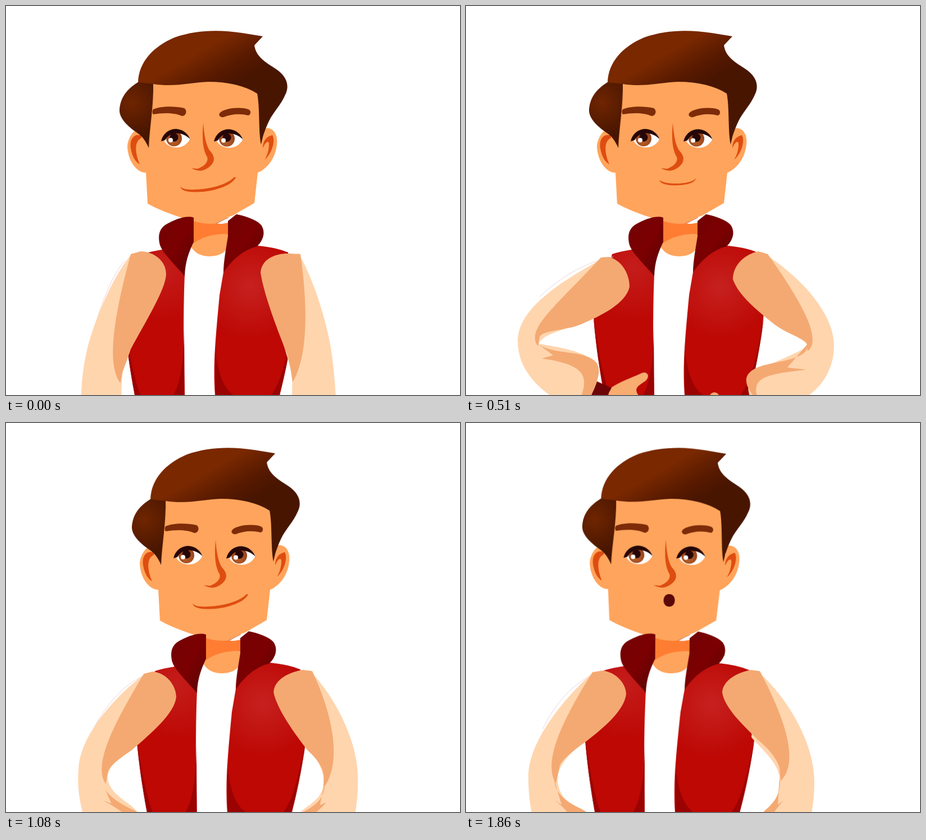
Animation, 808 px wide and 693 px high, one loop 1890 ms. Source, as an HTML page:

```html
<!DOCTYPE html>
<html lang="en">
<head>
<meta charset="utf-8">
<title>Standing man</title>
<style>
  html, body { margin: 0; width: 100%; height: 100%; overflow: hidden; background: #fff; }
  svg { display: block; width: 808px; height: 693px; }
  #body { transform-origin: 360px 693px; }
  .skin { fill: #ffa45c; }
  .hand { fill: #f8ac70; }
  .line { fill: #de4d10; }
  .brow { fill: #7d2b08; }
  .lash { fill: #260607; }
  .white { fill: #fff; }
  .shade { fill: #9a0302; }
  .light { fill: #ffd5ae; }
  .tan { fill: #f4a972; }
  #seam { fill: none; stroke: #ecd3d8; stroke-width: 1; }
</style>
</head>
<body>
<svg viewBox="0 0 808 693">
  <defs>
    <linearGradient id="hair" gradientUnits="userSpaceOnUse" x1="350" y1="80" x2="390" y2="150">
      <stop offset="0" stop-color="#792800"/><stop offset=".25" stop-color="#6a2200"/>
      <stop offset=".6" stop-color="#571900"/><stop offset="1.0" stop-color="#481500"/>
    </linearGradient>
    <radialGradient id="tuft" gradientUnits="userSpaceOnUse" cx="224" cy="172" r="62">
      <stop offset="0" stop-color="#6f2501"/><stop offset="1" stop-color="#471500"/>
    </radialGradient>
    <radialGradient id="iris" cx=".45" cy=".65" r=".6">
      <stop offset="0" stop-color="#b9612b"/><stop offset="1" stop-color="#98431a"/>
    </radialGradient>
    <radialGradient id="vest" gradientUnits="userSpaceOnUse" cx="435" cy="500" r="95">
      <stop offset="0" stop-color="#c6211f"/><stop offset="1" stop-color="#bd0804"/>
    </radialGradient>
    <radialGradient id="vestLeft" gradientUnits="userSpaceOnUse" cx="280" cy="465" r="100">
      <stop offset="0" stop-color="#c41d1b"/><stop offset="1" stop-color="#bd0804"/>
    </radialGradient>
    <linearGradient id="collar" x1="0" y1="0" x2="1" y2="1">
      <stop offset="0" stop-color="#720304"/><stop offset=".5" stop-color="#7c0001"/><stop offset="1" stop-color="#570507"/>
    </linearGradient>
  </defs>

  <g id="body">
    <path fill="url(#vestLeft)" d="M243 442Q258 437 278 434L305 440L318 478C315 550 316 620 318 693V720H233L229 693C221 650 214 605 210 555C222 525 232 480 243 442Z"/>
    <path fill="url(#vest)" d="M387 474L405 430L447 427C468 429 485 432 502 439L513 548C508 600 497 655 487 693L482 720H372V693C368 640 373 590 380 515Z"/>
    <path class="shade" d="M317 570C317 620 313 668 298 693L285 720H318ZM210 555C217 605 226 660 239 693L245 720H233L229 693C221 650 214 605 210 555ZM372 606C375 650 387 682 405 693L420 720H372ZM513 555C502 620 490 670 472 693L460 720H482L487 693C497 655 508 600 513 555Z"/>
    <path class="skin" d="M330 376V430Q340 446 363 446Q383 445 391 435L402 384Z"/>
    <path fill="#ff7d33" d="M330 376V425C348 411 370 406 392 406L402 412V380Z"/>
    <path class="skin" d="M250 218C232 212 216 232 216 252C218 278 233 297 249 297L252 352C280 368 325 382 350 387Q372 390 385 384L442 351L448 297C468 288 480 268 482 247C485 224 470 212 456 220L458 130H255Z"/>
    <path class="line" d="M241 231C228 226 219 238 222 254C225 270 231 278 238 282C231 266 226 242 241 235ZM474 230C461 233 457 243 457 253C462 242 467 239 468 245C468 257 465 266 460 274C473 263 480 240 474 230Z"/>
    <path class="white" d="M376 388L398 375L410 371L396 386L384 388Z"/>
    <path d="M374 387L396 377" fill="none" stroke="#c98a80" stroke-width="1"/>
    <path fill="url(#collar)" d="M334 377C322 372 300 380 285 389C272 397 270 410 274 426C279 440 297 457 318 481C319 455 325 440 334 420Z"/>
    <path fill="url(#collar)" d="M395 383L410 371C425 374 445 380 454 390C462 402 459 416 447 428C420 435 400 455 387 475C387 455 392 430 395 410Z"/>
    <path fill="url(#tuft)" d="M236 135C215 148 203 163 202 186C202 200 215 213 232 225C242 231 249 241 254 253C255 218 263 180 262 135Z"/>
    <path fill="url(#hair)" d="M235 136C236 100 262 72 300 56C340 42 380 42 420 48L457 54L442 70C445 91 462 100 480 112C500 125 505 142 497 158C490 175 475 190 468 205C460 222 456 235 454 247C449 225 452 180 447 156C425 142 395 135 360 135C330 136 300 145 262 139Z"/>
    <path class="brow" d="M262 184C275 178 300 178 317 182C323 186 321 196 313 196C300 190 280 190 262 193C260 191 260 186 262 184ZM381 190C390 182 415 179 431 184C437 186 436 194 431 195C415 191 400 193 387 198C381 199 377 194 381 190Z"/>
    <g id="eye">
      <path class="white" d="M280 238C288 222 318 222 328 236C322 248 313 252 303 252C293 252 284 247 280 238Z"/>
      <circle fill="url(#iris)" cx="299" cy="236" r="14"/>
      <circle class="lash" cx="299" cy="234" r="7.5"/>
      <circle class="white" cx="293" cy="239" r="4"/>
      <path class="lash" d="M276 241C279 227 290 219 303 219C316 220 324 228 328 238C316 224 292 222 283 239Z"/>
    </g>
    <use href="#eye" x="94" y="0.5"/>
    <path class="line" d="M351 208C353 235 357 250 363 258C374 270 371 280 360 288C350 295 342 295 330 289L341 290C352 286 361 278 358 269C349 254 349 230 351 208Z"/>
    <path id="mouth"/>
  </g>

  <g id="hands">
    <path class="hand" d="M255 682C275 668 295 662 312 654C324 650 328 660 319 668C305 677 299 681 306 692L325 780H240ZM433 694C438 686 446 686 451 694L460 780H430Z"/>
    <path fill="#6d0508" d="M232 668L259 680L248 700L215 700Z"/>
  </g>
  <path id="seam"/>
  <path id="outerL" class="light"/><path id="foreL" class="tan"/><path id="upperL" class="tan"/>
  <path id="outerR" class="light"/><path id="foreR" class="tan"/><path id="upperR" class="tan"/>
</svg>
<script>
const LOOP = 1890;
const TIMES = [0, 180, 510, 840, 960, 1320, 1620, 1860];

// Runs [time, style] keys in an endless loop; the last key is held to the end.
function loop(id, keys, easing = "linear") {
  const frames = keys.map(([t, style]) => ({ ...style, easing, offset: t / LOOP }));
  frames.push({ ...frames[frames.length - 1], offset: 1 });
  document.getElementById(id).animate(frames, { duration: LOOP, iterations: Infinity });
}
const shape = d => ({ d: `path("${d}")` });
const morph = (id, poses) => loop(id, poses.map((d, i) => [TIMES[i], shape(d)]));

const sway = [[0, 0], [6, 0], [17, 0], [24, 0], [25, 0], [15.5, .1], [5, .6], [0, .55]];
loop("body", sway.map(([x, a], i) => [TIMES[i], { transform: `translateX(${x}px) rotate(${a}deg)` }]));

const drop = [110, 55, 0, 65, 90, 38, 55, 70];
loop("hands", drop.map((y, i) => [TIMES[i], { transform: `translate(${sway[i][0] - 17}px, ${y}px)` }]));

morph("seam", [
  "M161 562C175 515 195 470 212 453",
  "M127 528C150 495 205 455 250 446",
  "M131 518C160 490 210 455 262 447",
  "M149 533C170 500 215 455 262 445",
  "M168 548C185 508 218 463 250 449",
  "M136 529C165 490 205 455 255 446",
  "M135 538C150 505 195 455 245 444",
  "M137 545C155 505 190 460 240 442"
]);
morph("outerL", [
  "M225 440C190 480 158 560 145 610C136 650 134 675 133 720L205 720C206 690 205 680 208 655C212 630 240 560 250 500Z",
  "M240 448C190 475 90 540 90 618C90 655 105 680 118 700L232 700C228 662 135 645 133 608C145 580 190 568 230 545Z",
  "M248 447C180 485 92 535 92 597C92 640 120 675 155 697L222 695C250 640 240 618 130 602C135 580 200 575 240 545Z",
  "M255 447C205 475 115 550 115 622C115 660 122 680 130 700L245 700C235 675 165 675 163 625C165 590 200 575 240 550Z",
  "M253 444C210 478 149 555 143 616C138 655 141 678 144 710L238 710C233 683 198 678 198 640C201 610 233 568 258 525Z",
  "M245 447C195 475 102 540 102 612C102 650 115 675 130 700L243 700C243 665 155 655 146 610C155 590 200 570 230 553Z",
  "M235 446C190 475 106 555 106 625C106 660 115 680 122 700L235 700C228 680 160 670 155 622C160 595 195 572 222 555Z",
  "M228 443C190 475 111 560 111 630C111 660 114 680 118 700L210 700C200 685 163 675 163 632C165 605 195 580 215 562Z"
]);
morph("upperL", [
  "M240 437C265 438 285 455 285 478C284 505 250 560 222 612C215 635 210 645 207 655L204 672C180 640 190 560 222 442Z",
  "M248 446C275 455 285 478 284 497C280 525 230 548 185 568C160 578 140 588 137 602L134 625C112 590 150 540 235 448Z",
  "M255 447C280 455 291 480 291 500C285 530 240 552 205 567C175 579 138 577 131 589L128 606C105 575 160 535 240 448Z",
  "M262 445C288 447 304 475 304 492C300 520 260 545 220 565C190 580 170 595 165 605L160 632C138 600 180 540 248 450Z",
  "M264 441C289 443 307 465 307 485C305 513 268 553 234 589C215 608 203 620 199 630L195 652C172 620 198 550 248 446Z",
  "M255 446C282 450 295 475 295 495C290 525 245 548 205 570C170 582 150 592 147 605L143 625C125 590 160 540 240 448Z",
  "M248 443C275 448 289 470 289 490C285 520 245 545 205 570C175 587 160 597 157 605L150 632C130 600 155 540 232 446Z",
  "M243 441C268 444 285 465 285 483C282 510 250 540 210 570C185 588 170 602 167 610L160 642C138 605 165 540 225 444Z"
]);
morph("foreL", [
  "M200 700C205 705 210 710 215 720C220 725 225 730 230 740L215 740C210 735 200 725 195 715L198 710Z",
  "M130 605C135 632 160 648 190 658C225 668 232 680 230 695L205 695C207 682 180 672 130 648L152 653Z",
  "M128 602C150 618 190 615 215 624C245 635 240 655 222 695L205 695C220 655 205 638 135 628L155 622Z",
  "M157 622C165 650 190 668 215 680C235 688 240 695 243 705L200 705C205 690 185 675 155 655L175 667Z",
  "M190 663C198 678 213 689 228 700C240 707 248 713 249 723L220 723C220 713 205 700 188 685L199 689Z",
  "M140 610C142 635 175 650 205 660C235 668 245 680 243 695L213 695C220 675 200 668 143 648L165 656Z",
  "M145 615C148 645 175 665 200 675C222 682 232 690 235 700L190 700C195 688 180 675 147 660L165 670Z",
  "M157 635C158 660 180 675 200 685C215 692 225 700 230 712L185 712C190 700 175 685 155 670L170 680Z"
]);
morph("outerR", [
  "M520 440C545 480 570 560 578 610C584 650 586 680 588 720L510 720C508 690 510 680 508 655C503 630 490 600 480 540Z",
  "M520 438C570 470 638 550 638 620C638 655 632 675 622 700L500 700C520 665 585 665 584 610C575 585 545 572 515 545Z",
  "M525 438C580 470 655 540 655 605C655 645 635 680 600 700L507 700C485 645 540 645 608 607C606 592 565 583 525 545Z",
  "M540 440C590 480 641 560 641 630C641 660 636 680 630 700L500 700C525 680 590 680 585 630C588 600 560 580 530 550Z",
  "M543 440C580 480 618 560 622 620C625 655 624 680 622 710L518 710C529 685 563 680 559 643C558 615 538 590 518 545Z",
  "M530 440C580 475 633 560 633 620C633 655 625 680 615 700L505 700C525 670 575 670 577 620C575 595 550 575 525 552Z",
  "M522 440C575 480 626 560 626 630C626 660 622 680 615 700L505 700C520 680 570 680 567 630C570 600 540 580 515 555Z",
  "M518 442C565 480 620 565 620 638C620 665 617 685 614 700L530 700C545 680 558 670 558 632C555 605 530 585 508 560Z"
]);
morph("upperR", [
  "M505 441C480 440 455 450 453 475C458 510 480 570 500 620C505 640 507 650 508 660L510 670C540 620 535 520 524 442Z",
  "M512 437C488 443 465 460 463 483C468 510 500 540 530 560C560 580 582 592 583 607L582 635C608 610 605 545 525 440Z",
  "M520 437C495 443 475 462 475 487C485 515 515 540 550 568C575 586 603 592 607 602L608 615C632 597 607 540 537 442Z",
  "M535 439C510 445 480 460 479 482C485 510 520 545 545 563C575 582 588 600 587 615L583 645C612 620 610 545 548 442Z",
  "M533 440C508 443 480 455 479 479C484 510 513 558 535 592C553 611 560 625 560 638L559 658C589 620 585 533 549 442Z",
  "M520 439C495 445 472 460 471 482C478 508 515 545 540 565C565 582 575 600 577 612L577 635C603 605 600 545 537 442Z",
  "M515 439C490 443 463 460 463 482C468 508 505 540 530 565C552 582 565 600 565 612L567 635C595 610 590 550 527 441Z",
  "M508 440C485 443 457 458 456 480C460 508 495 540 520 565C545 585 556 605 558 615L560 638C588 610 580 550 523 442Z"
]);
morph("foreR", [
  "M508 700C504 705 500 712 496 720C492 726 488 732 484 740L500 740C505 735 512 725 516 715L512 710Z",
  "M584 612C588 645 560 655 535 667C515 678 508 685 502 695L530 695C540 682 560 675 590 655L572 660Z",
  "M608 602C612 628 560 632 530 640C495 650 490 668 512 695L518 695C508 660 540 655 606 648L572 644Z",
  "M587 615C592 655 565 670 540 680C520 686 510 690 500 700L535 700C545 688 565 678 588 658L572 668Z",
  "M562 658C561 680 545 691 530 700C518 706 511 711 505 720L530 720C538 712 551 702 565 687L555 689Z",
  "M577 612C582 650 555 665 535 675C520 682 512 688 506 697L535 697C545 685 560 675 580 655L566 664Z",
  "M567 620C572 655 550 672 535 680C522 688 515 693 508 702L535 702C545 690 555 680 570 665L558 672Z",
  "M558 632C562 660 548 675 540 683C532 690 525 697 520 708L540 708C545 698 550 690 565 672L555 680Z"
]);

const mouth = (fill, d) => ({ fill, ...shape(d) });
const smile = mouth("#de4d10", "M310 321C314 328 330 328 350 326C375 323 395 316 406 305L409 305C404 318 375 329 350 331C330 332 312 332 310 321Z");
const smirk = mouth("#de4d10", "M327 310C335 316 350 317 365 316C378 315 388 312 392 307C391 314 378 319 358 319.5C342 320 329 317 327 310Z");
const teeth = mouth("#fff", "M338 309C344 313 350 315 358 314C368 314 374 309 379 309C376 317 368 318 360 318C352 320 342 321 338 309Z");
const round = mouth("#5b0808", "M348 316C348 301 368 301 368 316C368 331 348 331 348 316Z");
loop("mouth", [
  [0, smile], [480, smirk], [600, smile], [1260, teeth], [1380, smirk], [1440, smile], [1800, round]
], "step-end");
</script>
</body>
</html>
```
